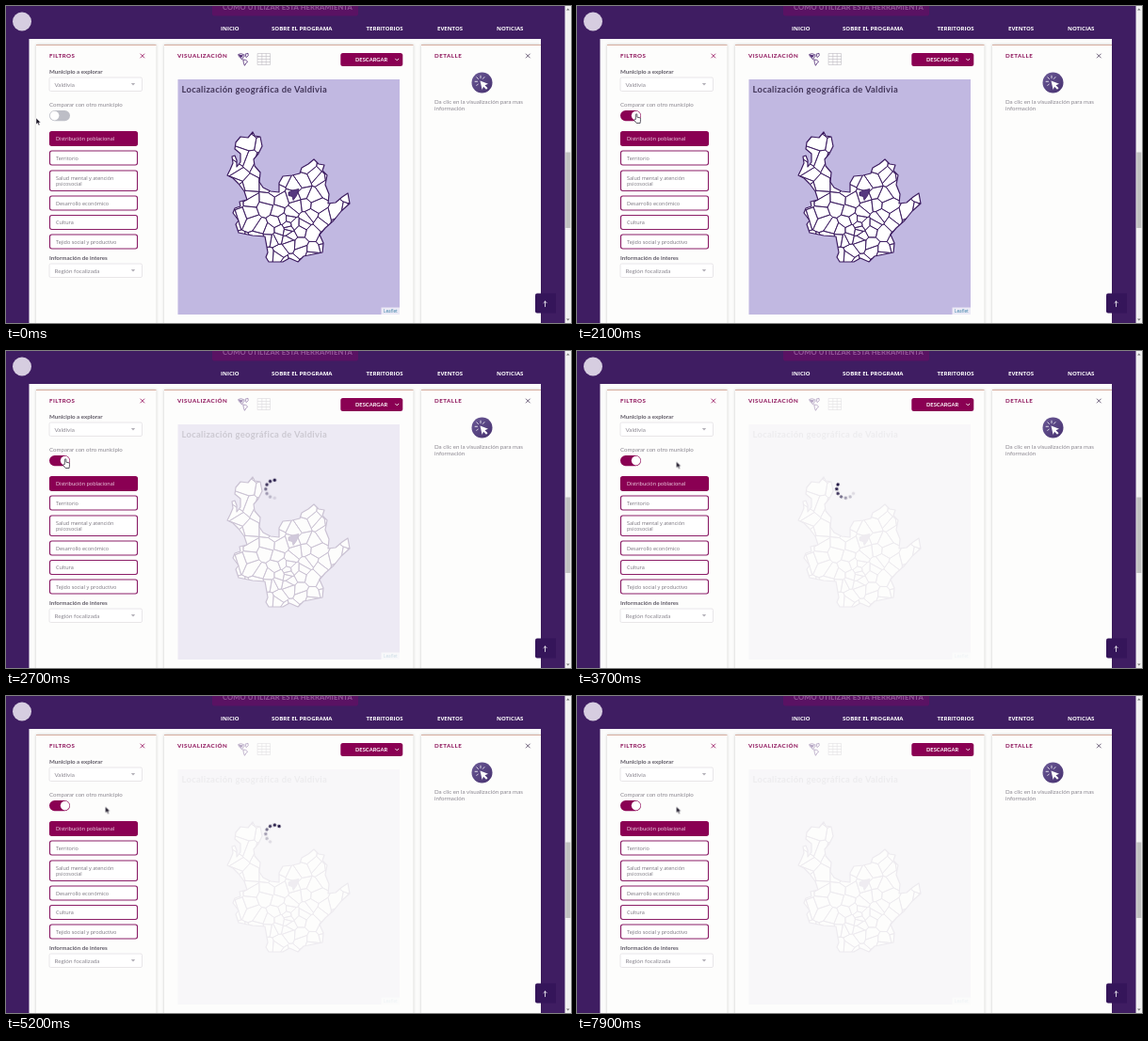
An HTML page that plays this animation: 600x337 px, repeating every 8 s.

```html
<!DOCTYPE html>
<html lang="es">
<head>
<meta charset="utf-8">
<title>Visualización</title>
<style>
  html, body { margin: 0; width: 100%; height: 100%; overflow: hidden; background: #3f1d62; }
  svg { display: block; width: 600px; height: 337px; }
  text { font-family: Lato, sans-serif; fill: #8b8790; font-size: 6.1px; }
  .nav text { font: 700 6.05px "Open Sans", sans-serif; fill: #fff; }
  .head { font-size: 6.2px; font-weight: 700; fill: #8a0c55; letter-spacing: .48px; }
  .label { font-size: 6.2px; font-weight: 700; fill: #625d69; }
  .opt text, .sans { font-family: "Open Sans", sans-serif; font-size: 5.5px; fill: #77727c; }
  .opt rect { fill: #fff; stroke: #8c1f68; stroke-width: 1.15; }
  .opt .on rect { fill: #8a0053; stroke: #8a0053; }
  .opt .on text { fill: #f3dcea; }
  .card { fill: #fdfdfc; filter: drop-shadow(0 0 1.5px #0003); }
  .line { fill: none; stroke-linecap: round; stroke-linejoin: round; }

  .veil, .icons, .spin, .ring, .knob, .track, .cursor, .arrow, .hand {
    animation: 8s linear infinite;
  }
  .veil { animation-name: veil; }
  .icons { animation-name: dim; }
  .spin { animation-name: show; opacity: 0; }
  .ring { animation-name: turn; animation-timing-function: steps(80); }
  .knob { animation-name: slide; }
  .track { animation-name: tint; }
  .cursor { animation-name: move; animation-timing-function: ease-in-out; }
  .arrow { animation-name: arrow; animation-timing-function: step-end; }
  .hand { animation-name: hand; animation-timing-function: step-end; }

  @keyframes veil { 0%, 28.75% { opacity: 0 } 35%, 100% { opacity: .92 } }
  @keyframes dim { 0%, 28.75% { opacity: 1 } 35%, 100% { opacity: .42 } }
  @keyframes show { 0%, 29.99% { opacity: 0 } 30%, 70.99% { opacity: 1 } 71%, 100% { opacity: 0 } }
  @keyframes turn { from { transform: rotate(-810deg) } to { transform: rotate(1590deg) } }
  @keyframes slide { 0%, 23% { transform: none } 25.5%, 100% { transform: translateX(11px) } }
  @keyframes tint { 0%, 23% { fill: #bdbec6 } 25.5%, 100% { fill: #8a0053 } }
  @keyframes move {
    0%, 5% { transform: translate(32px, 119px) }
    18.75%, 35% { transform: translate(63px, 115px) }
    42.5%, 100% { transform: translate(105.5px, 117.5px) }
  }
  @keyframes arrow { 0% { opacity: 1 } 12% { opacity: 0 } 37% { opacity: 1 } }
  @keyframes hand { 0% { opacity: 0 } 12% { opacity: 1 } 37% { opacity: 0 } }
</style>
</head>
<body>
<svg viewBox="0 0 600 337">
  <defs>
    <clipPath id="land"><path id="coast"/></clipPath>
    <linearGradient id="disc" x2="1" y2="1">
      <stop stop-color="#6b5a96"/><stop offset="1" stop-color="#46306f"/>
    </linearGradient>
  </defs>
  <rect width="600" height="337" fill="#3f1d62"/>

  <rect x="219" y="-6" width="155" height="16.5" rx="2" fill="#5a1263"/>
  <text x="230" y="3.6" style="font-size:7.55px;font-weight:700;fill:#94589a;letter-spacing:.12px">CÓMO UTILIZAR ESTA HERRAMIENTA</text>
  <circle cx="17" cy="16.5" r="10" fill="#d6cde0"/>
  <g class="nav">
    <text x="228" y="26.4">INICIO</text>
    <text x="282" y="26.4">SOBRE EL PROGRAMA</text>
    <text x="382.5" y="26.4">TERRITORIOS</text>
    <text x="458" y="26.4">EVENTOS</text>
    <text x="521" y="26.4">NOTICIAS</text>
  </g>

  <rect x="24.5" y="35" width="543.5" height="302" fill="#fcfcfb"/>
  <g id="cards"></g>

  <text class="head" x="46" y="54.6">FILTROS</text>
  <path class="line" d="M142.8 51l4 4m0-4l-4 4" stroke="#a0266b" stroke-width=".9"/>
  <text class="label" x="46" y="72.3">Municipio a explorar</text>
  <text x="46" y="107.4">Comparar con otro municipio</text>
  <text class="label" x="46" y="270.3">Información de interes</text>
  <g id="selects"></g>
  <rect class="track" x="46" y="111" width="22" height="11.2" rx="5.6" fill="#bdbec6"/>
  <circle class="knob" cx="51.6" cy="116.6" r="4.8" fill="#fff"/>
  <g class="opt" id="options"></g>

  <text class="head" x="182" y="54.6">VISUALIZACIÓN</text>
  <g class="icons">
    <g fill="#fff" stroke="#4b2470" stroke-width=".8" stroke-linejoin="round">
      <path d="M246.6 51.5l3-.8 3 1 .6 1.8-1.8 1.2-.4 2-2-1.2-1.6-2zM251.8 57l2.8.4 2 1.6-1.8 2-1.4 2.3-1-2.8zM254 51.2l3-.9.2 2.4-2 2z"/>
      <path d="M247.5 52.2l4 .6-2 1.9z" fill="#4b2470"/>
    </g>
    <path class="line" d="M267.5 50.5h13v12h-13zM267.5 53.5h13m-13 3h13m-13 3h13M271.8 50.5v12m4.4-12v12" stroke="#c6c3ca" stroke-width=".7"/>
  </g>
  <rect x="355.3" y="50" width="66" height="14" rx="2.5" fill="#8a0053"/>
  <text x="371" y="59.2" style="font-size:5.75px;font-weight:700;fill:#fff">DESCARGAR</text>
  <path class="line" d="M413.6 56.2l1.6 1.6 1.6-1.6" stroke="#fff" stroke-width=".9"/>

  <rect x="182.5" y="78" width="235.5" height="250" fill="#c1b8e1"/>
  <text x="186.5" y="92.2" style="font-size:9.4px;font-weight:700;fill:#43365a;letter-spacing:.32px">Localización geográfica de Valdivia</text>
  <g stroke="#3c1c60" stroke-linejoin="round">
    <path id="shape" fill="#fff" stroke-width="1.2"/>
    <path id="cells" fill="none" stroke-width=".85" clip-path="url(#land)"/>
    <path d="M300 198l4-2 7-1.5-1.500 5-1.500 3-3 4-1-4-4-1z" fill="#56397f" stroke-width=".8"/>
  </g>
  <rect x="398.5" y="320.5" width="19.5" height="7.5" fill="#fff" opacity=".7"/>
  <text class="sans" x="401" y="326.2" style="font-size:4.7px;fill:#3a7fa5">Leaflet</text>
  <rect class="veil" x="182" y="77.5" width="236.5" height="251" fill="#fdfdfc" opacity="0"/>
  <g class="spin" transform="translate(285.3 146.7)"><g class="ring" id="ring"></g></g>

  <text class="head" x="455" y="54.6">DETALLE</text>
  <path class="line" d="M552.3 51l4 4m0-4l-4 4" stroke="#5a4a68" stroke-width=".9"/>
  <circle cx="505.5" cy="81.5" r="11" fill="url(#disc)"/>
  <path d="M503.5 79.5l8.500 3.200-3.500 1.500 3 3-1.500 1.500-3-3-1.400 3.300z" fill="#fff"/>
  <path class="line" d="M501.5 77.5l-1.700-1.700M504 76.500v-2.300M500.500 80.300h-2.400M506.500 77.300l1.500-1.700M501.300 83l-1.500 1.500" stroke="#fff" stroke-width=".8"/>
  <text x="455" y="103.900" style="font-size:6.2px">Da clic en la visualización para mas</text>
  <text x="455" y="110.700" style="font-size:6.2px">información</text>

  <path d="M564 305.5h20v21h-20q-2 0-2-2v-17q0-2 2-2z" fill="#35155a"/>
  <path class="line" d="M572.5 319.5v-5.500m-1.600 1.600l1.600-1.600 1.600 1.600" stroke="#fff" stroke-width=".8"/>
  <rect x="593.5" width="6.500" height="337" fill="#f1f1f1"/>
  <rect x="594.3" y="155.500" width="5" height="80.500" fill="#c1c1c1"/>
  <path d="M595 4.500l1.800-2 1.800 2zM595 332.500l1.800 2 1.800-2z" fill="#777"/>

  <g class="cursor">
    <path class="arrow" d="M0 0v6.800l1.600-1.400 1.200 2.500 1.200-.6-1.200-2.400h2.200z" fill="#1b1626" stroke="#fff" stroke-width=".5"/>
    <path class="hand" d="M-.7 5.500V.2q.8-1 1.600 0v3l3 .7q.8.300.7 1.300l-.5 4.300H.2l-2.500-3.200q.4-1.300 1.600-.8z" fill="#fff" stroke="#1b1626" stroke-width=".7" stroke-linejoin="round"/>
  </g>
</svg>
<script>
  const put = (id, html) => document.getElementById(id).innerHTML = html;
  const setPath = (id, d) => document.getElementById(id).setAttribute('d', d);

  put('cards', [[32, 127.5], [168, 264.5], [441, 127]].map(([x, w]) =>
    `<rect class="card" x="${x}" y="41" width="${w}" height="310"/>
     <rect x="${x}" y="41" width="${w}" height=".9" fill="#d3a596"/>`).join(''));

  put('selects', [[76, 'Valdivia'], [274, 'Región focalizada']].map(([y, s]) =>
    `<rect x="46" y="${y}" width="98.5" height="14.5" rx="1.5" fill="#fff" stroke="#e2e0e4" stroke-width=".8"/>
     <text x="51.5" y="${y + 9.5}" style="font-size:6.3px">${s}</text>
     <path d="M132.8 ${y + 6}h4.400l-2.200 2.400z" fill="#b3b0b8"/>`).join(''));

  put('options', [
    [133, 'Distribución poblacional'], [153.5, 'Territorio'],
    [174.5, 'Salud mental y atención', 'psicosocial'],
    [201.5, 'Desarrollo económico'], [222, 'Cultura'],
    [242.5, 'Tejido social y productivo']
  ].map(([y, ...lines], i) =>
    `<g class="${i ? '' : 'on'}">
      <rect x="46.5" y="${y + .5}" width="93" height="${lines.length > 1 ? 21.5 : 15}" rx="2.2"/>
      ${lines.map((s, k) => `<text x="53" y="${y + 10 + k * 6}">${s}</text>`).join('')}
    </g>`).join(''));

  // Spinner dots trail counter-clockwise from the head at the top.
  put('ring', [1, .95, .85, .6, .4, .25, .12].map((a, i) =>
    `<circle cy="-9.5" r="1.7" fill="#1d1240" opacity="${a}" transform="rotate(${-30 * i})"/>`).join(''));

  const coast = 'M262 134L264 138 270 139 272 149 268 157 263 163 264 170 270 177 269 187' +
    ' 273 193 281 197 290 198 290 188 294 181 304 180 312 178 314 172 321 168 327 163' +
    ' 332 168 338 169 336 175 341 180 339 190 343 200 342 210 350 209 357 203 363 199' +
    ' 365 210 356 218 348 228 339 236 333 243 337 252 336 262 326 264 316 266 310 272' +
    ' 301 268 294 272 279 272 276 267 278 262 275 245 262 244 247 241 244 232 247 228' +
    ' 241 220 243 215 249 213 248 208 256 206 253 197 247 189 241 183 235 180 238 174' +
    ' 241 167 240 160 243 159 245 164 245 171 249 166 249 157 243 152 244 145 249 139 257 140z';
  setPath('coast', coast);
  setPath('shape', coast);

  // Districts: Voronoi cells of a jittered spiral, dense in the middle.
  let seed = 11;
  const jitter = size => ((seed = seed * 16807 % 2147483647) / 2147483647 - .5) * size;
  const sites = Array.from({ length: 220 }, (_, i) => {
    const r = 2.5 * (i + .5) ** .74, a = i * 2.4 + jitter(.5);
    return [299 + r * Math.cos(a) + jitter(6), 238 + r * Math.sin(a) + jitter(6)];
  });

  // Keeps the part of a polygon that lies nearer to a than to b.
  function cut(poly, [ax, ay], [bx, by]) {
    const nx = bx - ax, ny = by - ay;
    const side = p => (p[0] - (ax + bx) / 2) * nx + (p[1] - (ay + by) / 2) * ny;
    const out = [];
    poly.forEach((p, i) => {
      const q = poly[(i + 1) % poly.length], s = side(p), t = side(q);
      if (s <= 0) out.push(p);
      if (s * t < 0) {
        const k = s / (s - t);
        out.push([p[0] + (q[0] - p[0]) * k, p[1] + (q[1] - p[1]) * k]);
      }
    });
    return out;
  }

  const frame = [[225, 125], [375, 125], [375, 280], [225, 280]];
  setPath('cells', sites.map(s => {
    const cell = sites.reduce((poly, o) => o === s ? poly : cut(poly, s, o), frame);
    return cell.length ? 'M' + cell.map(p => p.map(v => v.toFixed(1))).join('L') + 'z' : '';
  }).join(''));
</script>
</body>
</html>
```
